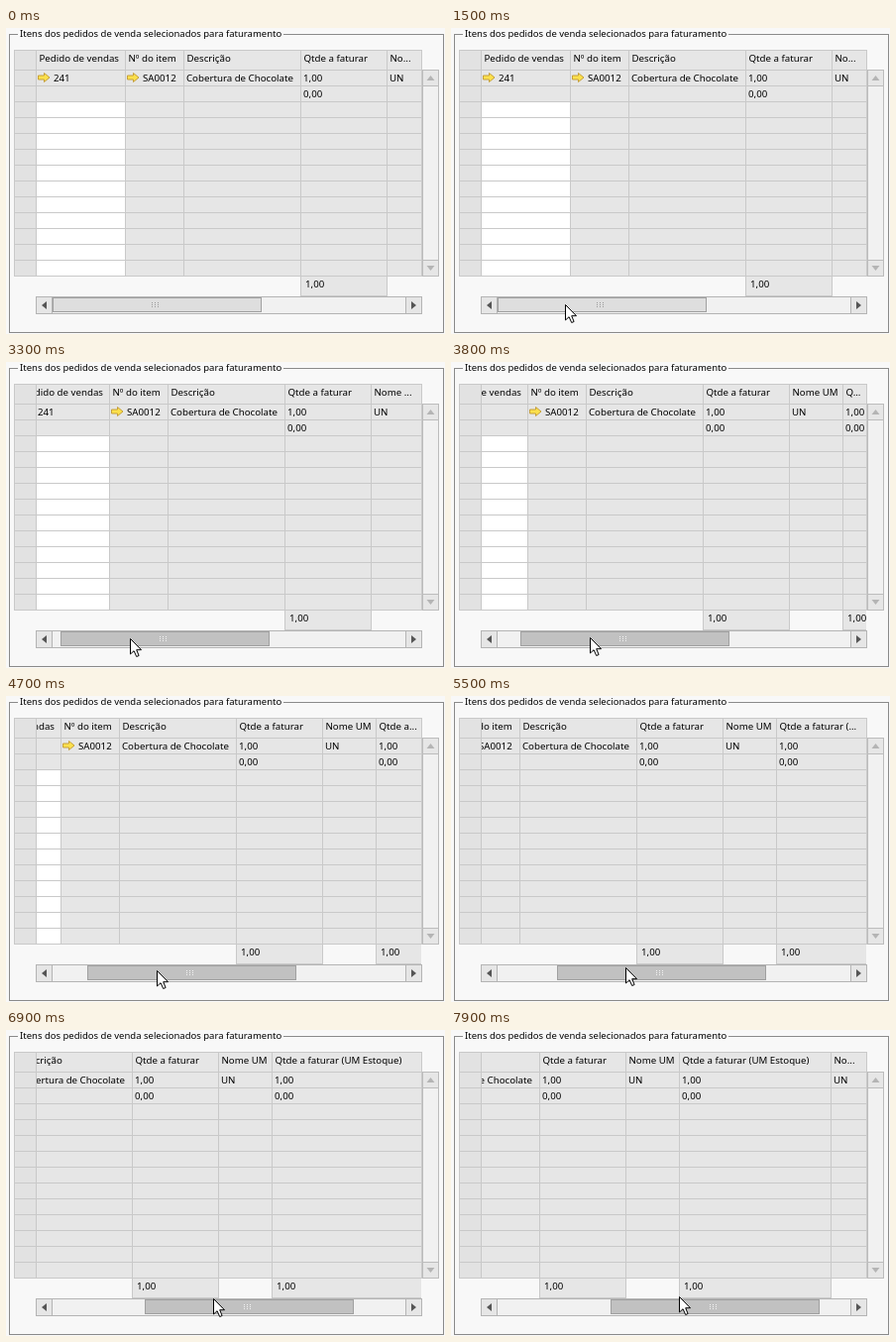
Write an HTML page with a canvas that moves like this. It is 443 px wide and 309 px high and loops after 8 s.

```html
<!DOCTYPE html>
<html lang="pt">
<head>
<meta charset="utf-8">
<style>
  html, body { margin: 0; width: 100%; height: 100%; overflow: hidden; background: #f8f8f8; }
  canvas { display: block; }
</style>
</head>
<body>
<canvas id="stage" width="443" height="309"></canvas>
<script>
const ctx = document.getElementById('stage').getContext('2d');
const LOOP = 8000, STEP = 100;
const LEFT = 30, RIGHT = 419, TOP = 22, BODY = 42, ROW = 16, ROWS = 13, BOTTOM = BODY + ROW * ROWS;
const LINE = '#c9c9c9', CELL = '#e6e6e6', PAGE = '#f8f8f8', INK = '#000';
const FONT = 'px "Noto Sans", "Open Sans", sans-serif';
const LINK_ARROW = new Path2D('M.5 3h6V.5L12 5 6.5 9.5V7h-6z');
const POINTER = new Path2D('M.5.5V16l3.6-3.3 2.6 5.8 2.4-1-2.4-5.8h4.8z');

const columns = [
  { w: 90, title: 'Pedido de vendas', cells: ['241'], arrow: true, editable: true },
  { w: 59, title: 'Nº do item', cells: ['SA0012'], arrow: true },
  { w: 118, title: 'Descrição', cells: ['Cobertura de Chocolate'] },
  { w: 87, title: 'Qtde a faturar', cells: ['1,00', '0,00'], total: '1,00' },
  { w: 54, title: 'Nome UM', cells: ['UN'] },
  { w: 153, title: 'Qtde a faturar (UM Estoque)', cells: ['1,00', '0,00'], total: '1,00' },
  { w: 54, title: 'Nome UM', cells: ['UN'] }
];

// The drag goes in bursts with short rests between them.
const bursts = [
  { from: 2500, until: 3000, to: 5 },
  { from: 3100, until: 3800, to: 43 },
  { from: 3900, until: 4200, to: 48 },
  { from: 4400, until: 5500, to: 110 },
  { from: 5600, until: 6700, to: 160 },
  { from: 6800, until: 7300, to: 208 }
];

const progress = (t, a, b) => Math.min(1, Math.max(0, (t - a) / (b - a)));
const mix = (a, b, p) => a + (b - a) * p;

const scrollAt = t => Math.round(bursts.reduce((s, b) => mix(s, b.to, progress(t, b.from, b.until)), 0));

function pointerAt(t, scroll) {
  if (t >= 2200) return [116.1 + scroll / 1.83, 280 - scroll / 19];
  const enter = progress(t, 300, 1100), settle = 1 - (1 - progress(t, 1100, 1500)) ** 2;
  return [mix(56, 122, enter) - 7 * settle, mix(31, 259, enter) + 20 * settle];
}

function rect(x, y, w, h, color) {
  ctx.fillStyle = color;
  ctx.fillRect(x, y, w, h);
}

function frame(x, y, w, h, fill, line) {
  rect(x, y, w, h, line);
  rect(x + 1, y + 1, w - 2, h - 2, fill);
}

function text(str, x, y, size = 9.7) {
  ctx.font = size + FONT;
  ctx.fillStyle = INK;
  ctx.fillText(str, x, y);
}

function shape(path, x, y, fill, stroke) {
  ctx.save();
  ctx.translate(x, y);
  ctx.fillStyle = fill;
  ctx.strokeStyle = stroke;
  ctx.fill(path);
  ctx.stroke(path);
  ctx.restore();
}

// Triangle centred on x, y; dx, dy give the direction it points to.
function triangle(x, y, dx, dy, color) {
  ctx.beginPath();
  ctx.moveTo(x + dx * 2.5, y + dy * 2.5);
  ctx.lineTo(x - dx * 2.5 + dy * 4, y - dy * 2.5 + dx * 4);
  ctx.lineTo(x - dx * 2.5 - dy * 4, y - dy * 2.5 - dx * 4);
  ctx.fillStyle = color;
  ctx.fill();
}

function fitTitle(title, x) {
  ctx.font = 9.7 + FONT;
  const fits = s => x + ctx.measureText(s).width <= 415.3;
  if (fits(title)) return title;
  let n = title.length;
  while (n > 0 && !fits(title.slice(0, n) + '...')) n--;
  return n ? title.slice(0, n) + '...' : '';
}

function drawColumn(col, x) {
  const end = x + col.w;
  if (x >= RIGHT || end <= LEFT) return;
  rect(x, TOP, col.w, BOTTOM - TOP, CELL);
  if (col.editable) rect(x, BODY + 2 * ROW, col.w, ROW * (ROWS - 2), '#fff');
  for (let r = 0; r <= ROWS; r++) rect(x, BODY + r * ROW, col.w, 1, LINE);
  rect(x, TOP, col.w, 1, LINE);
  rect(x, TOP, 1, BOTTOM - TOP, LINE);
  rect(end, TOP, 1, BOTTOM - TOP, LINE);
  text(end > RIGHT ? fitTitle(col.title, x + 3.5) : col.title, x + 3.5, 34);
  col.cells.forEach((c, r) => text(c, x + (col.arrow ? 18 : 3), 54 + r * ROW));
  if (col.arrow) shape(LINK_ARROW, x + 2, 45, '#fbe04c', '#c5a03c');
  if (col.total) {
    frame(x, BOTTOM, col.w + 1, 21, CELL, LINE);
    text(col.total, x + 5, 262);
  }
}

function drawTable(scroll) {
  rect(8, TOP, 23, BOTTOM - TOP, '#e2e2e2');
  rect(8, TOP, 1, BOTTOM - TOP, LINE);
  rect(8, TOP, 23, 1, LINE);
  for (let r = 0; r <= ROWS; r++) rect(8, BODY + r * ROW, 23, 1, LINE);
  ctx.save();
  ctx.beginPath();
  ctx.rect(LEFT + 1, TOP, RIGHT - LEFT - 1, 249);
  ctx.clip();
  let x = LEFT - scroll;
  for (const col of columns) {
    drawColumn(col, x);
    x += col.w;
  }
  ctx.restore();
  rect(LEFT, TOP, 1, BOTTOM - TOP, LINE);
  rect(RIGHT, TOP, 1, BOTTOM - TOP + 1, LINE);
}

function drawScrollbars(scroll, pressed) {
  frame(420, BODY, 17, BOTTOM - BODY + 1, '#f1f1f1', '#bcbcbc');
  for (const [y, dir] of [[BODY, -1], [BOTTOM - 16, 1]]) {
    frame(420, y, 17, 17, CELL, '#bcbcbc');
    triangle(428.5, y + 8.5, 0, dir, '#b4b4b4');
  }
  frame(LEFT, 271, 390, 18, '#f1f1f1', '#b4b4b4');
  for (const [x, dir] of [[LEFT, -1], [403, 1]]) {
    frame(x, 271, 17, 18, CELL, '#b4b4b4');
    triangle(x + 8.5, 280, dir, 0, '#555');
  }
  const thumb = Math.max(47, Math.floor(46.55 + scroll / 1.815));
  frame(thumb, 272, 211, 15, pressed ? '#c1c1c1' : '#dedede', '#a0a0a0');
  for (let i = 0; i < 9; i++)
    rect(thumb + 100 + i % 3 * 3, 277 + Math.floor(i / 3) * 2, 1, 1, pressed ? '#f4f4f4' : '#999');
}

function draw(now) {
  const t = Math.floor(now % LOOP / STEP) * STEP;
  const scroll = scrollAt(t);
  rect(0, 0, 443, 309, PAGE);
  frame(3, 6, 439, 302, PAGE, '#8a8a8a');
  rect(12, 0, 268, 13, PAGE);
  text('Itens dos pedidos de venda selecionados para faturamento', 14, 9, 9.5);
  drawTable(scroll);
  drawScrollbars(scroll, t >= 2300);
  if (t >= 300) {
    const [x, y] = pointerAt(t, scroll).map(Math.round);
    shape(POINTER, x, y, '#fff', '#000');
  }
}

const start = performance.now();
function tick() {
  draw(performance.now() - start);
  requestAnimationFrame(tick);
}
tick();
</script>
</body>
</html>
```
